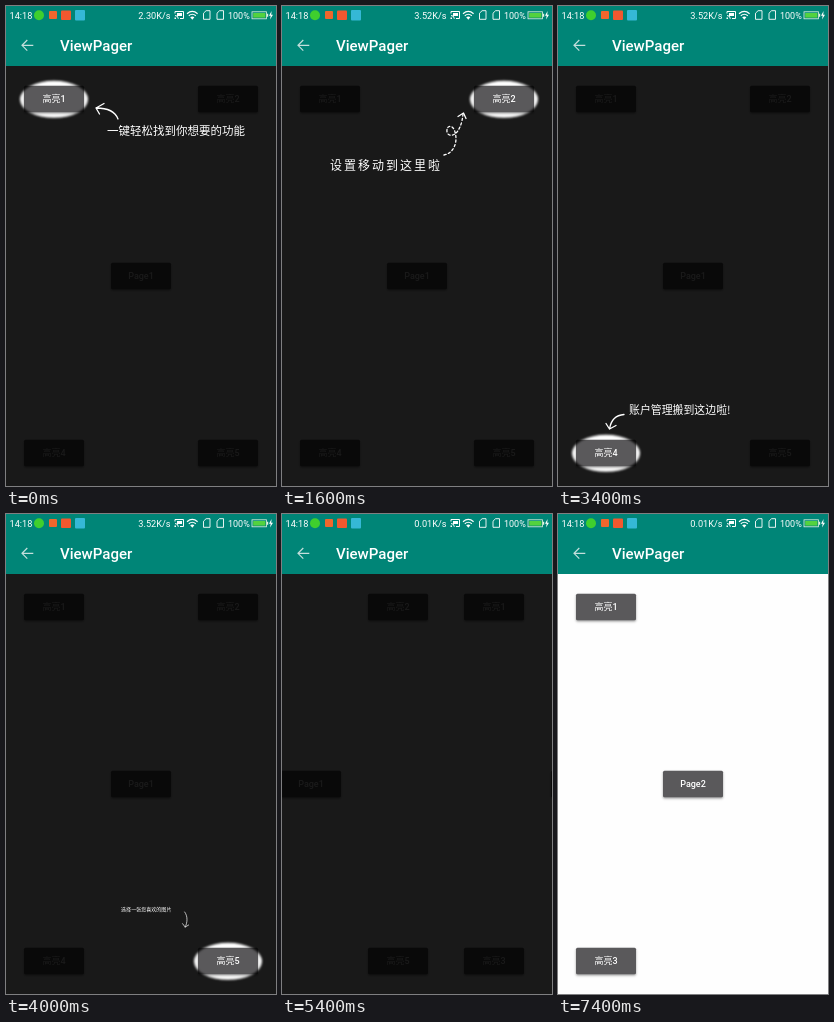
An HTML page with a canvas that plays this animation: 270 by 480 pixels, repeating every 8 s.

```html
<!DOCTYPE html>
<html lang="zh">
<head>
<meta charset="utf-8">
<title>ViewPager</title>
<style>
html, body { margin: 0; width: 100%; height: 100%; overflow: hidden; background: #1a1a1a; }
canvas { display: block; }
</style>
</head>
<body>
<canvas id="stage" width="270" height="480"></canvas>
<script>
const W = 270, H = 480, TOP = 60, LOOP = 8000, STEP = 200;
const ctx = document.getElementById('stage').getContext('2d');
const mask = document.createElement('canvas');
mask.width = W;
mask.height = H;
const mctx = mask.getContext('2d');

const LATIN = 'Roboto, "Noto Sans CJK SC", "Noto Sans CJK", sans-serif';
const HAND = '"Noto Sans CJK SC", "Noto Sans CJK", sans-serif';

// Buttons by centre point
const pages = [
  [['高亮1', 48, 93], ['高亮2', 222, 93], ['Page1', 135, 270], ['高亮4', 48, 447], ['高亮5', 222, 447]],
  [['高亮1', 48, 93], ['Page2', 135, 270], ['高亮3', 48, 447]]
];

// Hints: text, left, middle, size, tracking, arrow, pivot
const hints = {
  find: { text: '一键轻松找到你想要的功能', x: 101, y: 125, size: 11.5, track: 0,
    arrow: 'M112 113Q108 102 90 102M98 97.5L90 102L93.5 108', pivot: [164, 115] },
  moved: { text: '设置移动到这里啦', x: 48, y: 160, size: 12, track: 2, dashed: true,
    arrow: 'M162 149C172 147 176 136 173 126C171 118 164 119 165 126C167 133 179 130 181 108',
    head: 'M176 110.5L181.5 107L184 112.5', pivot: [116.5, 136.5] },
  balance: { text: '余额搬到这边啦', x: 27, y: 225, size: 12.1, track: 0,
    arrow: 'M120 227C126 231 125 238 121.5 243M116 238.5L121 243.5L127 239.5', pivot: [77, 231] },
  account: { text: '账户管理搬到这边啦!', x: 71, y: 403.5, size: 10.9, track: 0,
    arrow: 'M66 408.5C58 409 53 414 51.5 423M48 417.5L51.5 423L58 419.5', pivot: [110, 411] },
  picture: { text: '选择一张您喜欢的图片', x: 85, y: 389.5, size: 9.5, track: 0,
    arrow: 'M205 394C211 402 210.5 413 206 422.5M201 416L206 422.5L212.5 418.5', pivot: [149, 402.5] }
};

// Guide stages: start, focused button, hint, growth per step
const guide = [
  { at: 0, focus: 0, hint: hints.find, grow: [1] },
  { at: 1000, focus: 1, hint: hints.moved, grow: [0.57, 0.854, 0.975, 1] },
  { at: 2000, focus: 2, hint: hints.balance, grow: [0.64, 0.9, 0.98, 1] },
  { at: 2800, focus: 3, hint: hints.account, grow: [0.57, 0.86, 0.995, 1] },
  { at: 4000, focus: 4, hint: hints.picture, grow: [0.53, 0.867, 0.957, 1] }
];
const SCROLL_AT = 5400, GROUP_AT = 5600, CLEAR_AT = 7400, SCROLL_X = 106;

function label(text, x, y, font, color = '#fff', align = 'left') {
  ctx.font = font;
  ctx.fillStyle = color;
  ctx.textAlign = align;
  ctx.textBaseline = 'alphabetic';
  ctx.fillText(text, x, y);
}

function box(x, y, w, h, color, r = 0) {
  ctx.fillStyle = color;
  ctx.beginPath();
  ctx.roundRect(x, y, w, h, r);
  ctx.fill();
}

function line(d, width, color = '#fff') {
  ctx.strokeStyle = color;
  ctx.lineWidth = width;
  ctx.stroke(new Path2D(d));
}

function drawStatus(speed) {
  const font = '9.2px ' + LATIN;
  label('14:18', 3.5, 13, font);
  ctx.fillStyle = '#3fcf2e';
  ctx.beginPath();
  ctx.arc(33, 9.3, 5, 0, 7);
  ctx.fill();
  box(43, 5, 8, 8, '#f0662c', 1);
  box(55, 4.5, 10, 9.5, '#f2582f', 1);
  box(69, 4, 10, 10.5, '#35b8d6', 1);
  label(speed, 164.5, 13, font, '#fff', 'right');

  // Cast
  line('M169 7.5V5.5H177.5V12.5H174M169 9.5a3.3 3.3 0 0 1 3.3 3.3', 1);
  box(171, 7, 5, 3, '#fff');
  box(168.5, 11.5, 1.5, 1.5, '#fff');
  // Wi-Fi
  line('M181 7.7Q186.3 3.2 191.6 7.7M182.8 9.7Q186.3 6.8 189.8 9.7', 1.2);
  ctx.fillStyle = '#fff';
  ctx.fill(new Path2D('M184.2 11.3Q186.3 9.8 188.4 11.3L186.3 13.8Z'));
  // SIM cards
  for (const x of [197.5, 211]) line(`M${x} 13.3V7.2L${x + 2.6} 4.7H${x + 6.5}V13.3Z`, 0.9);

  label('100%', 222, 13, '9px ' + LATIN);
  ctx.strokeStyle = '#e4f4e0';
  ctx.lineWidth = 0.8;
  ctx.strokeRect(246, 5.8, 14.5, 7);
  box(247.2, 7, 12.2, 4.6, '#53d23f');
  box(261, 7.8, 1.2, 3, '#e4f4e0');
  ctx.fillStyle = '#fff';
  ctx.fill(new Path2D('M265.6 5L263 9.8H264.7L264 13.6L267 8.7H265.2Z'));
}

function drawBar(speed) {
  box(0, 0, W, TOP, '#008577');
  drawStatus(speed);
  line('M27.3 39.3H16.5M21.3 34L16 39.3L21.3 44.6', 1.2, '#c4dfdc');
  label('ViewPager', 54, 45, '500 15px ' + LATIN);
}

function drawPage(page, dx) {
  for (const [text, x, y] of pages[page]) {
    const cx = x + dx;
    ctx.save();
    ctx.shadowColor = 'rgba(0,0,0,.4)';
    ctx.shadowBlur = 2.5;
    ctx.shadowOffsetY = 1.3;
    box(cx - 30, y - 13.3, 60, 26.6, '#5a595b', 1.5);
    ctx.restore();
    label(text, cx, y + 3.3, '500 9px ' + LATIN, '#fff', 'center');
  }
}

function drawMask(holes, oval) {
  mctx.globalCompositeOperation = 'source-over';
  mctx.clearRect(0, 0, W, H);
  mctx.fillStyle = 'rgba(0,0,0,.9)';
  mctx.fillRect(0, TOP, W, H - TOP);
  mctx.globalCompositeOperation = 'destination-out';
  mctx.fillStyle = '#000';
  mctx.filter = 'blur(1.3px)';
  for (const [, x, y] of holes) {
    mctx.beginPath();
    if (oval) mctx.ellipse(x, y + 0.3, 34, 18.5, 0, 0, 7);
    else mctx.roundRect(x - 33.5, y - 18.5, 67, 37, 1);
    mctx.fill();
  }
  mctx.filter = 'none';
  ctx.drawImage(mask, 0, 0);
}

function drawHint(hint, scale = 1, dx = 0, dy = 0) {
  const [px, py] = hint.pivot;
  ctx.save();
  ctx.translate(px + dx, py + dy);
  ctx.scale(scale, scale);
  ctx.translate(-px, -py);
  ctx.lineCap = ctx.lineJoin = 'round';
  if (hint.dashed) ctx.setLineDash([2.2, 2.4]);
  line(hint.arrow, 1.3);
  ctx.setLineDash([]);
  if (hint.head) line(hint.head, 1.3);
  ctx.letterSpacing = hint.track + 'px';
  label(hint.text, hint.x, hint.y + hint.size * 0.37, `300 ${hint.size}px ${HAND}`);
  ctx.restore();
}

function draw(t) {
  box(0, 0, W, H, '#fefefe');
  if (t < SCROLL_AT) {
    const stage = guide.findLast(g => t >= g.at);
    const step = Math.floor((t - stage.at) / STEP);
    drawPage(0, 0);
    drawMask([pages[0][stage.focus]], true);
    drawHint(stage.hint, stage.grow[Math.min(step, stage.grow.length - 1)]);
  } else if (t < GROUP_AT) {
    drawPage(0, -SCROLL_X);
    drawPage(1, W - SCROLL_X);
    drawMask([], false);
  } else {
    drawPage(1, 0);
    if (t < CLEAR_AT) {
      drawMask(pages[1], false);
      drawHint(hints.find, 1, -24, 24);
      drawHint(hints.balance);
      drawHint(hints.account, 1, 5, -2.5);
    }
  }
  drawBar(t < 200 ? '2.30K/s' : t < SCROLL_AT ? '3.52K/s' : '0.01K/s');
}

function tick() {
  draw(performance.now() % LOOP);
  requestAnimationFrame(tick);
}
tick();
</script>
</body>
</html>
```
